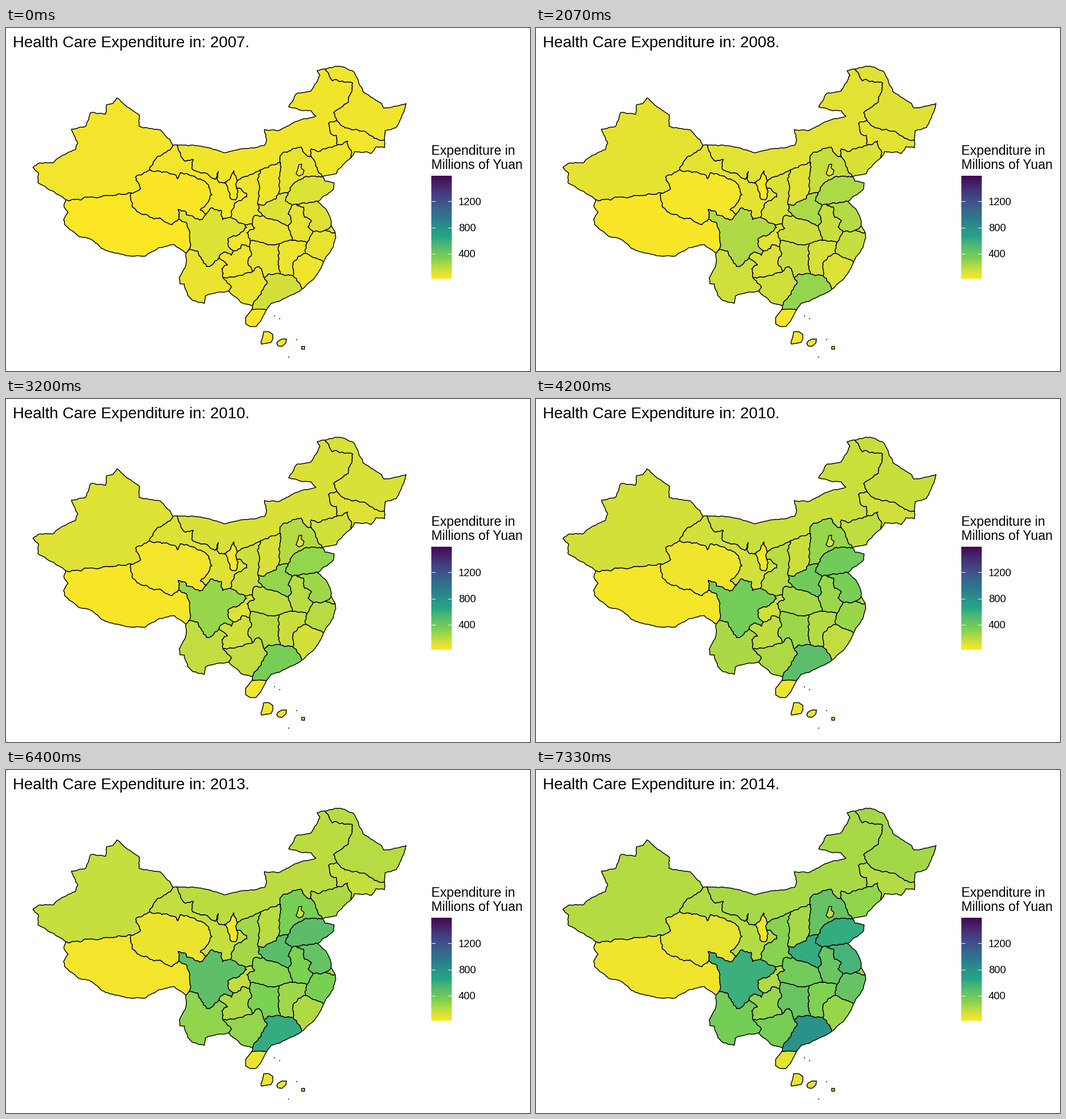
Recreate the animation shown at these times as a matplotlib script. Size 924 by 606 pixels, loop 8 s.

```python
import random
from itertools import combinations
import numpy as np
import matplotlib.pyplot as plt
from matplotlib.animation import FuncAnimation
from matplotlib.collections import PolyCollection

W, H, DPI = 924, 606, 100
LOOP, TICK = 8000, 20
STEPS = [1000, 1070, 2070, 2130, 3130, 3200, 4200, 4270,
         5270, 5330, 6330, 6400, 7270, 7330]
STOPS = ["#FDE725", "#7AD151", "#22A884", "#2A788E", "#414487", "#440154"]

# spending by year as a share of 2014, common to all provinces
YEARS = range(2007, 2015)
GROWTH = [.145, .22, .47, .44, .77, .775, .78, 1]
# 2014 spending in thousandths of the colour scale
SIZE = dict(XJ=117, XZ=22, QH=38, GS=120, NM=138, NX=25, SN=184, SX=140, HE=268, HA=380,
            LN=170, JL=120, HL=146, SD=380, JS=345, SH=160, ZJ=265, AH=255, HB=228, HN=255,
            JX=195, FJ=160, GD=485, GX=215, GZ=166, YN=220, SC=365, CQ=126, BJ=100, HI=42)

random.seed(11)
plt.rcParams["font.family"] = "Liberation Sans"

# ---- colour scale, blended in Lab ----
M = np.array([[.4124, .3576, .1805], [.2126, .7152, .0722], [.0193, .1192, .9505]])
WHITE = M.sum(axis=1)


def to_lab(hex_color):
    c = np.array([int(hex_color[i:i + 2], 16) for i in (1, 3, 5)]) / 255
    lin = np.where(c > .04045, ((c + .055) / 1.055) ** 2.4, c / 12.92)
    x, y, z = np.cbrt(M @ lin / WHITE)
    return 116 * y - 16, 500 * (x - y), 200 * (y - z)


LABS = np.array([to_lab(s) for s in STOPS])


def fill(frac):
    pos = np.linspace(0, 1, len(STOPS))
    l, a, b = (np.interp(frac, pos, LABS[:, k]) for k in range(3))
    y = (l + 16) / 116
    f = np.stack([y + a / 500, y, y - b / 200], axis=-1)
    lin = np.clip((f ** 3 * WHITE) @ np.linalg.inv(M).T, 0, 1)
    return np.clip(np.where(lin > .0031308, 1.055 * lin ** (1 / 2.4) - .055,
                            12.92 * lin), 0, 1)


# ---- map: junctions where territories meet; OUT is everything outside ----
JUNCTIONS = {
    "XJ GS OUT": (294, 207), "GS NM OUT": (301, 206), "XJ GS QH": (253, 250),
    "XJ QH XZ": (220, 291), "XJ XZ OUT": (105, 303), "XZ QH SC": (304, 337),
    "XZ SC YN": (322, 391), "XZ YN OUT": (317, 397), "QH GS SC": (353, 328),
    "GS NM NX": (384, 273), "NX NM SN": (407, 271), "NX GS SN": (406, 282),
    "GS SN SC": (395, 334), "NM HL OUT": (562, 72), "NM JL HL": (583, 162),
    "JL HL OUT": (667, 197), "NM LN JL": (584, 206), "LN JL OUT": (608, 229),
    "HE LN NM": (538, 227), "HE LN SD OUT": (557, 262), "HE SX NM": (484, 238),
    "HE SX HA": (480, 292), "SN SX NM": (448, 250), "SN SX HA": (444, 311),
    "HE SD HA": (497, 291), "SD HA AH": (504, 313), "SD JS AH": (511, 311),
    "SD JS OUT": (549, 306), "JS SH OUT": (573, 349), "JS SH ZJ": (562, 357),
    "SH ZJ OUT": (580, 361), "JS ZJ AH": (541, 359), "ZJ AH JX": (530, 379),
    "ZJ JX FJ": (528, 398), "ZJ FJ OUT": (559, 413), "JX FJ GD": (506, 438),
    "FJ GD OUT": (521, 461), "HN JX GD": (483, 434), "HN GX GD": (455, 441),
    "GX GD OUT": (434, 490), "GZ GX HN": (433, 431), "GZ YN GX": (382, 441),
    "YN GX OUT": (392, 464), "SC GZ YN": (375, 405), "SC CQ GZ": (400, 393),
    "CQ GZ HN": (429, 386), "CQ HB HN": (430, 376), "SN CQ HB": (434, 346),
    "SN SC CQ": (421, 347), "SN HA HB": (452, 331), "HA HB AH": (497, 349),
    "AH HB JX": (504, 375), "HB HN JX": (481, 381),
}
bends = {}


def pairs(*xy):
    return list(zip(xy[::2], xy[1::2]))


def bend(codes, *xy):
    bends[frozenset(codes.split())] = pairs(*xy)


# outer edge
bend("XJ OUT", 92, 294, 70, 281, 56, 273, 57, 256, 47, 246, 58, 238, 82, 238, 92, 229, 122, 214,
     126, 203, 115, 178, 140, 173, 149, 149, 175, 152, 177, 135, 188, 133, 195, 123, 213, 139,
     235, 154, 234, 173, 271, 179, 288, 196)
bend("XZ OUT", 102, 316, 109, 325, 101, 338, 103, 347, 127, 367, 146, 371, 168, 389, 183, 395,
     213, 402, 246, 402, 268, 388, 296, 382)
bend("NM OUT", 343, 208, 384, 220, 410, 214, 455, 207, 459, 197, 455, 179, 478, 181, 510, 165,
     546, 155, 538, 146, 516, 144, 498, 139, 512, 115, 537, 111, 553, 83, 548, 75)
bend("HL OUT", 580, 67, 597, 69, 613, 77, 629, 112, 641, 120, 662, 133, 666, 141, 690, 137,
     705, 133, 700, 150, 688, 175, 668, 181)
bend("JL OUT", 614, 218, 634, 218, 644, 221, 652, 209, 667, 211)
bend("LN OUT", 582, 257, 584, 251, 604, 232)
bend("SD OUT", 562, 270, 578, 273, 577, 284)
bend("JS OUT", 565, 322, 573, 341)
bend("ZJ OUT", 581, 370, 577, 384)
bend("FJ OUT", 543, 442, 552, 428)
bend("GD OUT", 433, 497, 459, 497, 467, 486, 484, 481, 512, 467)
bend("GX OUT", 400, 472, 415, 485)
bend("YN OUT", 317, 417, 305, 441, 306, 451, 314, 452, 320, 472, 329, 481, 349, 486, 351, 473,
     370, 467)
# west
bend("XJ GS", 289, 215, 268, 226)
bend("XJ QH", 228, 263, 237, 283)
bend("XJ XZ", 188, 296, 136, 300)
bend("XZ QH", 222, 315, 238, 328, 275, 338, 292, 347)
bend("XZ SC", 317, 343, 323, 367)
bend("QH GS", 296, 258, 302, 266, 307, 255, 333, 262, 356, 276, 363, 294, 352, 312, 342, 321)
bend("QH SC", 303, 320, 315, 323, 318, 330, 341, 339)
bend("GS SC", 362, 317, 379, 322, 381, 338)
bend("GS NM", 313, 233, 330, 232, 329, 250, 352, 256, 368, 267, 374, 253, 375, 272)
bend("NX NM", 396, 262, 401, 252)
bend("NX GS", 404, 303, 397, 302, 390, 279)
bend("GS SN", 424, 292, 424, 298, 403, 309)
# north
bend("NM HL", 575, 93, 611, 97, 603, 131, 577, 149)
bend("NM JL", 582, 189, 573, 187, 568, 168)
bend("JL HL", 597, 176, 614, 179, 636, 185, 655, 196)
bend("LN JL", 602, 199)
bend("LN NM", 538, 213, 547, 217)
bend("HE NM", 483, 225, 489, 219, 520, 210, 528, 223)
bend("SN NM", 432, 258)
bend("SN SX", 443, 268, 447, 282)
# centre and south
bend("SX HA", 453, 313, 475, 302)
bend("HE SD", 525, 263, 506, 275)
bend("SD HA", 492, 305)
bend("JS AH", 524, 316, 526, 334, 538, 340, 532, 351)
bend("HA AH", 497, 328, 503, 341)
bend("SN HA", 444, 321)
bend("SN HB", 438, 331)
bend("SC CQ", 424, 352, 406, 367, 391, 372, 391, 381)
bend("CQ HB", 438, 353, 424, 361)
bend("CQ GZ", 413, 389, 416, 382)
bend("HN GD", 461, 435)
bend("JX FJ", 505, 420, 515, 403)
bend("GX HN", 446, 421)
bend("GX GD", 459, 452)
bend("GZ HN", 431, 403, 426, 411)
bend("SC GZ", 397, 401, 384, 395)
bend("SC YN", 363, 418, 353, 421, 338, 394)
bend("YN GZ", 390, 418, 380, 425)
bend("YN GX", 397, 457)


def gap(p, q):
    return np.hypot(p[0] - q[0], p[1] - q[1])


def roughen(pts, amp):
    out = [pts[0]]
    for p, q in zip(pts, pts[1:]):
        d = gap(p, q)
        if d > 4:
            k = random.uniform(-amp, amp) * min(1, 10 / d)
            out.append(((p[0] + q[0]) / 2 - k * (q[1] - p[1]),
                        (p[1] + q[1]) / 2 + k * (q[0] - p[0])))
        out.append(q)
    return out


def trace(pair):
    """Wiggly line between the two junctions that a pair of territories shares."""
    a, b = (xy for name, xy in JUNCTIONS.items() if pair <= set(name.split()))
    mid = bends.get(pair, [])
    if mid and gap(a, mid[0]) + gap(b, mid[-1]) > gap(a, mid[-1]) + gap(b, mid[0]):
        a, b = b, a
    pts = [a, *mid, b]
    for _ in range(4):
        pts = roughen(pts, .1 if "OUT" in pair else .2)
    return pts


meetings = [frozenset(p) for name in JUNCTIONS for p in combinations(name.split(), 2)]
arcs = {p: trace(p) for p in dict.fromkeys(meetings) if meetings.count(p) == 2}


def ring(code):
    parts = [pts for pair, pts in arcs.items() if code in pair]
    path = list(parts.pop(0))
    while parts:
        end = path[-1]
        nxt = min(parts, key=lambda p: min(gap(end, p[0]), gap(end, p[-1])))
        parts.remove(nxt)
        path += nxt if gap(end, nxt[0]) <= gap(end, nxt[-1]) else nxt[::-1]
    return path


shapes = {code: ring(code) for code in SIZE if code not in ("BJ", "HI")}
islands = [
    pairs(433, 497, 422, 511, 422, 522, 430, 527, 440, 527, 448, 518, 459, 497, 446, 496),
    pairs(454, 536, 463, 536, 470, 541, 470, 549, 467, 555, 450, 558, 449, 555, 452, 546),
    pairs(479, 553, 486, 549, 494, 549, 493, 556, 486, 562, 479, 561, 477, 557),
    pairs(520, 561, 525, 561, 525, 566, 520, 566),
]
capital = pairs(516, 241, 521, 240, 520, 247, 525, 251, 523, 258, 516, 261, 511, 257, 514, 249)
polys = [*shapes.values(), capital, *islands]
sizes = np.array([SIZE[c] for c in [*shapes, "BJ", *["HI"] * len(islands)]]) / 1000

# ---- stage ----
fig = plt.figure(figsize=(W / DPI, H / DPI), dpi=DPI, facecolor="white")
ax = fig.add_axes([0, 0, 1, 1])
ax.axis("off")


def px(n):
    return n * 72 / DPI


def label(x, y, text, size):
    return ax.text(x, y, text, fontsize=px(size), color="black", va="baseline")


ax.imshow(fill(np.linspace(1, 0, 182))[:, None, :], extent=(749.5, 785.5, 442.5, 260.5),
          aspect="auto", interpolation="nearest")
land = ax.add_collection(PolyCollection(polys, edgecolors="black", linewidths=px(1.45),
                                        joinstyle="round"))
ax.plot([472, 481, 511, 497], [507, 512, 549, 580], "o", color="black", ms=px(2), mew=0)
for value in (400, 800, 1200):
    y = 444.8 - value * .1157
    for x in (749.5, 778.3):
        ax.plot([x, x + 7.2], [y, y], color="white", lw=px(1), solid_capstyle="butt")
    label(797.4, y + 6.4, str(value), 18.33)
label(749.2, 223.2, "Expenditure in", 23.15)
label(749.2, 248.2, "Millions of Yuan", 23.15)
title = label(12, 33.6, "", 27.7)
# integer coordinates are pixel centres
ax.set_xlim(-.5, W - .5)
ax.set_ylim(H - .5, -.5)


def draw(i):
    t = i * TICK + TICK / 2
    year = 2007 + sum(t >= s for s in STEPS) / 2
    land.set_facecolor(fill(sizes * np.interp(year, YEARS, GROWTH)))
    title.set_text(f"Health Care Expenditure in: {round(year)}.")
    return land, title


anim = FuncAnimation(fig, draw, frames=LOOP // TICK, interval=TICK,
                     repeat=True, repeat_delay=0)
plt.show()
```
